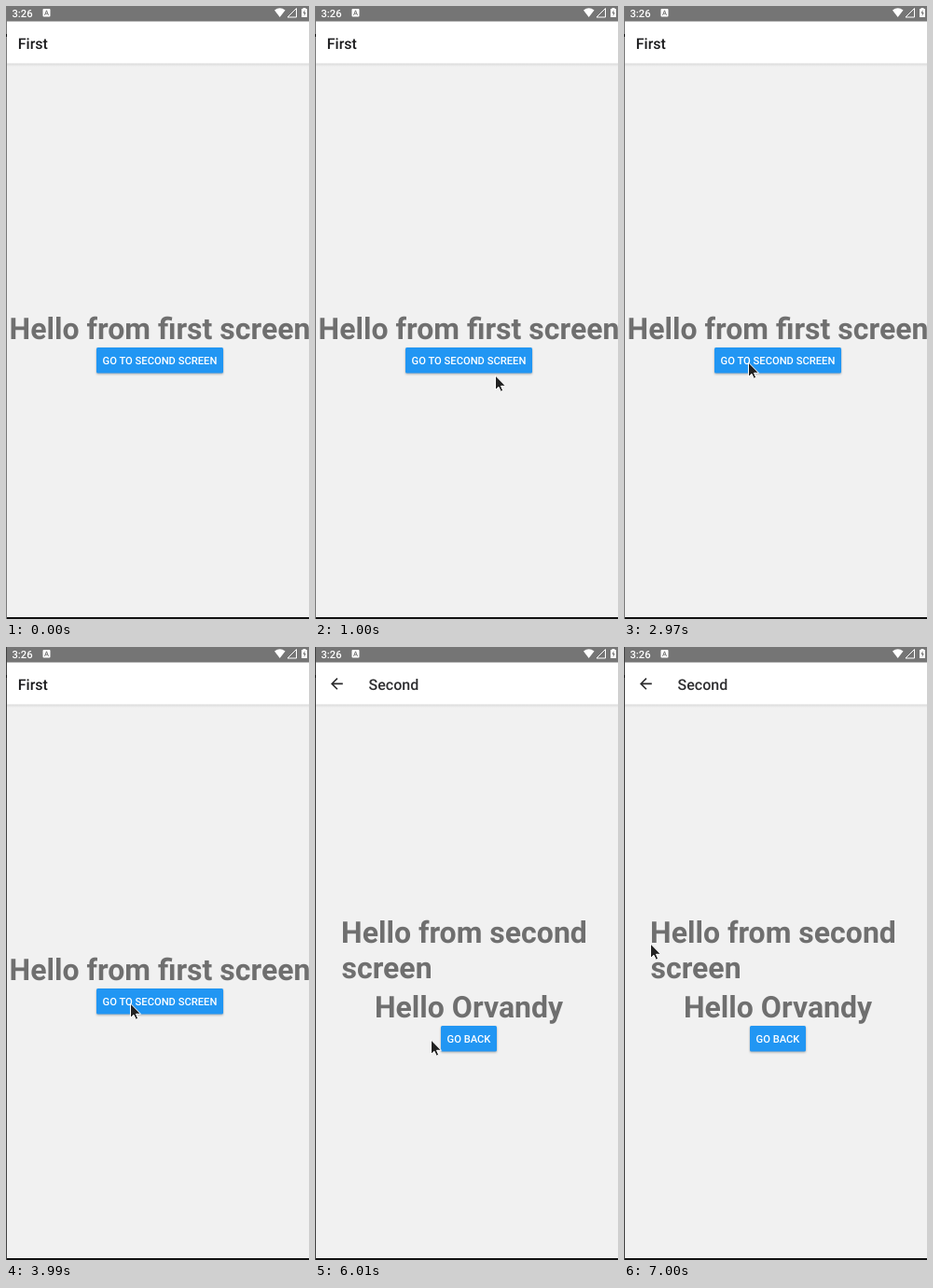
These frames come from a looping animation (325x657 px, 8 s). An HTML page:

```html
<!DOCTYPE html>
<html lang="en">
<head>
<meta charset="utf-8">
<title>Screen navigation</title>
<style>
  html, body { margin: 0; width: 100%; height: 100%; overflow: hidden; background: #f1f1f1; }
  svg { display: block; width: 100%; height: 100%; font-family: Roboto, sans-serif; text-rendering: geometricPrecision; }

  .heading { font-size: 32px; font-weight: 700; fill: #6f6f6f; }
  .title { font-size: 16px; font-weight: 500; fill: #1c1c1e; }
  .label { font-size: 11.2px; font-weight: 500; fill: #fff; }
  .mid { text-anchor: middle; }
  .button { fill: #2196f3; filter: drop-shadow(0 1px 1px rgba(0, 0, 0, .3)); }

  #first, #second, #pressable, #edge, #cursor { animation: 8s step-end infinite; }
  #first { animation-name: leave; }
  #second { animation-name: enter; }
  #pressable { animation-name: press; }
  #edge { animation-name: edge; }
  #cursor { animation-name: point; }

  @keyframes leave { 0% { visibility: visible; } 75.125%, 100% { visibility: hidden; } }
  @keyframes enter { 0% { visibility: hidden; } 75.125%, 100% { visibility: visible; } }
  @keyframes press { 0% { fill: #2196f3; } 62.625%, 100% { fill: #1c83d8; } }
  @keyframes edge { 0% { fill: #777; } 49.875%, 100% { fill: #404040; } }
  @keyframes point {
    0% { transform: translate(-40px, -40px); }
    12.5% { transform: translate(192px, 395px); }
    24.625% { transform: translate(87px, 357px); }
    37.125% { transform: translate(132px, 381px); }
    62.625% { transform: translate(123px, 420px); }
    87.5%, 100% { transform: translate(27px, 317px); }
  }
</style>
</head>
<body>
<svg viewBox="0 0 325 657">
  <defs>
    <linearGradient id="shade" x2="0" y2="1">
      <stop stop-color="#d6d6d6"/>
      <stop offset="1" stop-color="#f1f1f1"/>
    </linearGradient>
  </defs>

  <rect width="325" height="657" fill="#f1f1f1"/>
  <rect y="61" width="325" height="4" fill="url(#shade)"/>
  <rect y="16" width="325" height="45.5" fill="#fff"/>

  <!-- Status bar -->
  <rect width="325" height="16.5" fill="#757575"/>
  <text class="label" x="6.5" y="11.5">3:26</text>
  <g fill="#fff">
    <rect x="39.5" y="3" width="8" height="8.5" rx="1"/>
    <path d="M288 4.5Q293.7 0 299.500 4.500L293.700 12Z"/>
    <path d="M311.500 2.500V12H302Z" fill="none" stroke="#fff"/>
    <path d="M317 3h1.500V2h3v1H323v9h-6z"/>
  </g>
  <path d="M41.500 9.800L43.500 4.800L45.500 9.800M42.300 8.200h2.400" fill="none" stroke="#757575"/>
  <path d="M320.500 4L318.500 7.800h1.300V11L321.700 7h-1.200z" fill="#757575"/>

  <g id="first">
    <text class="title" x="12.8" y="45.500">First</text>
    <text class="heading mid" x="165" y="357">Hello from first screen</text>
    <rect id="pressable" class="button" x="97" y="366" width="136" height="27.500" rx="1.500"/>
    <text class="label mid" x="165" y="384">GO TO SECOND SCREEN</text>
  </g>

  <g id="second">
    <path transform="translate(13.800 29.800) scale(.8)" fill="#2b2b2d"
      d="M20 11H7.830l5.590-5.590L12 4l-8 8 8 8 1.410-1.410L7.830 13H20z"/>
    <text class="title" x="57.600" y="45.500" style="fill:#2f2f31">Second</text>
    <g class="heading">
      <text x="28" y="317">Hello from second</text>
      <text x="28.500" y="355">screen</text>
      <text class="mid" x="165" y="397">Hello Orvandy</text>
    </g>
    <rect class="button" x="135" y="406" width="60" height="27.500" rx="1.500"/>
    <text class="label mid" x="165" y="424">GO BACK</text>
  </g>

  <!-- Window frame -->
  <rect y="655" width="325" height="2" fill="#111"/>
  <rect id="edge" width="1" height="657"/>
  <rect y="30" width="1" height="3" fill="#111"/>

  <path id="cursor" d="M1.500 1V16.500L5 13.300L7.300 18.300L9.700 17.200L7.500 12.300H12.500Z"
    fill="#222" stroke="#fff" stroke-width="1"/>
</svg>
</body>
</html>
```
